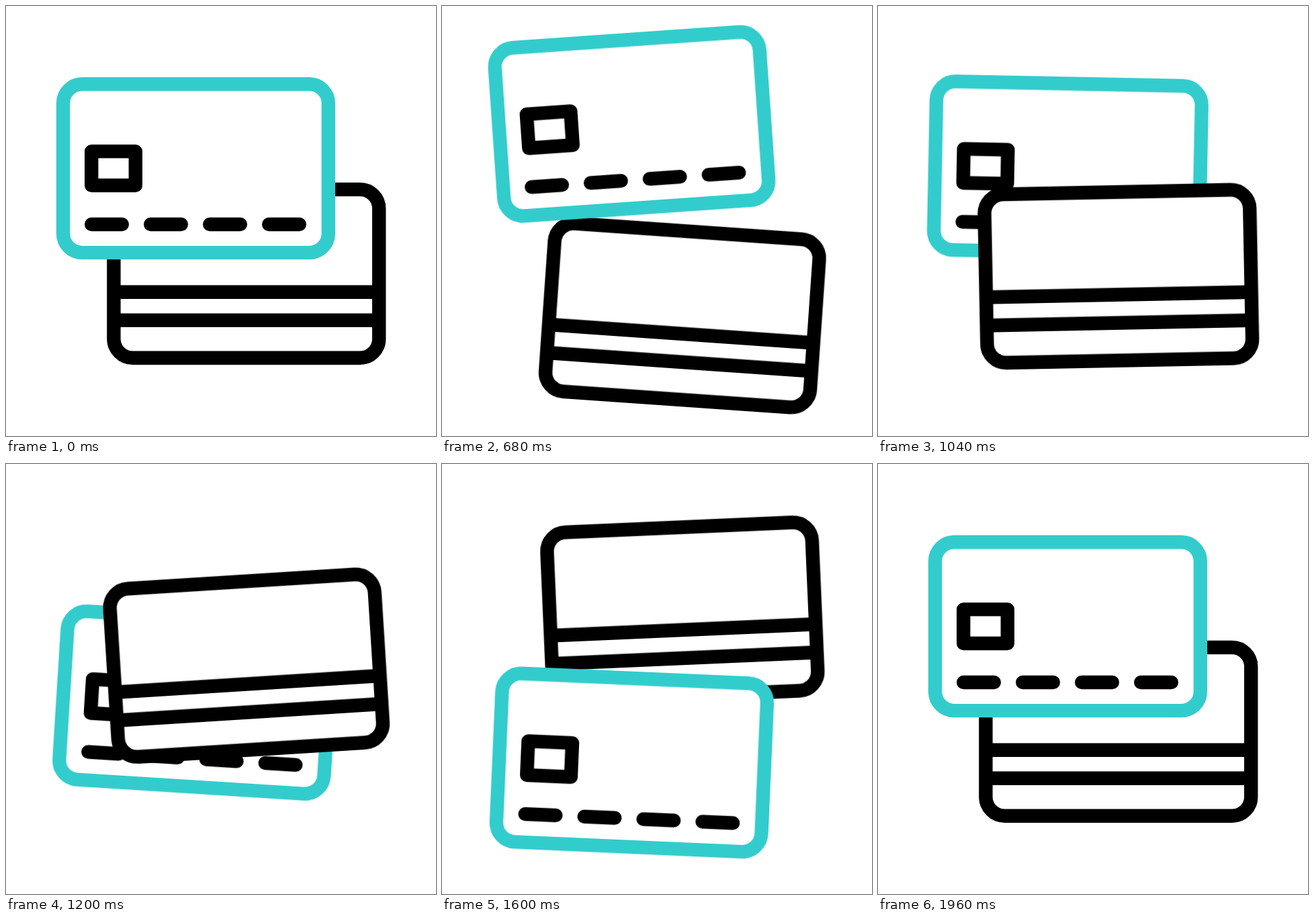
Write an HTML page that moves like this. It is 640 by 640 pixels and loops after 2 s.

```html
<!DOCTYPE html>
<html lang="en">
<head>
<meta charset="utf-8">
<title>Swapping cards</title>
<style>
  html, body {
    margin: 0;
    width: 100%;
    height: 100%;
    overflow: hidden;
    background: #fff;
  }

  .stage {
    position: relative;
    width: 100%;
    height: 100%;
    overflow: clip;
    contain: strict;
  }

  .card {
    position: absolute;
    left: 0;
    top: 0;
    width: 640px;
    height: 640px;
    overflow: visible;
    fill: #fff;
    stroke: #000;
    stroke-width: 20.4;
    stroke-linejoin: round;
    animation: 2s cubic-bezier(.3333, 0, .6667, 1) infinite;
    animation-name: slide, tilt;
  }

  .front {
    --first: -74.5px;
    --second: 241px;
    --tilt-first: -4deg;
    --tilt-second: 4.25deg;
    transform-origin: 282.4px 241.7px;
    z-index: 1;
  }

  .back {
    --first: 70px;
    --second: -212.5px;
    --tilt-first: 4deg;
    --tilt-second: -4.25deg;
    transform-origin: 357.8px 398.4px;
    animation-name: slide, tilt, restack;
  }

  .teal { stroke: #33cccc; }
  .dashes { stroke-linecap: round; }

  @keyframes slide {
    0%, 4% { translate: 0 0; }
    42% { translate: 0 var(--first); }
    74% { translate: 0 var(--second); }
    98%, 100% { translate: 0 0; }
  }

  @keyframes tilt {
    0%, 4.75% { rotate: 0deg; }
    33% { rotate: var(--tilt-first); }
    65.75% { rotate: var(--tilt-second); }
    98%, 100% { rotate: 0deg; }
  }

  /* The cards trade depth while they are apart. */
  @keyframes restack {
    0% { z-index: 0; animation-timing-function: step-end; }
    42% { z-index: 2; animation-timing-function: step-end; }
    74%, 100% { z-index: 0; }
  }
</style>
</head>
<body>
  <div class="stage">
    <svg class="card back" viewBox="0 0 640 640">
      <rect x="160.4" y="273" width="394.8" height="250.8" rx="28.4"/>
      <path d="M160.4 425.7H555.2M160.4 467.7H555.2"/>
    </svg>
    <svg class="card front" viewBox="0 0 640 640">
      <rect class="teal" x="85" y="116.3" width="394.8" height="250.8" rx="28.4"/>
      <path d="M127.2 216.4H192.8V267H127.2Z"/>
      <path class="dashes" d="M127.2 325h45.6m42.4 0h45.6m42.4 0h45.6m42.4 0h45.6"/>
    </svg>
  </div>
</body>
</html>
```
